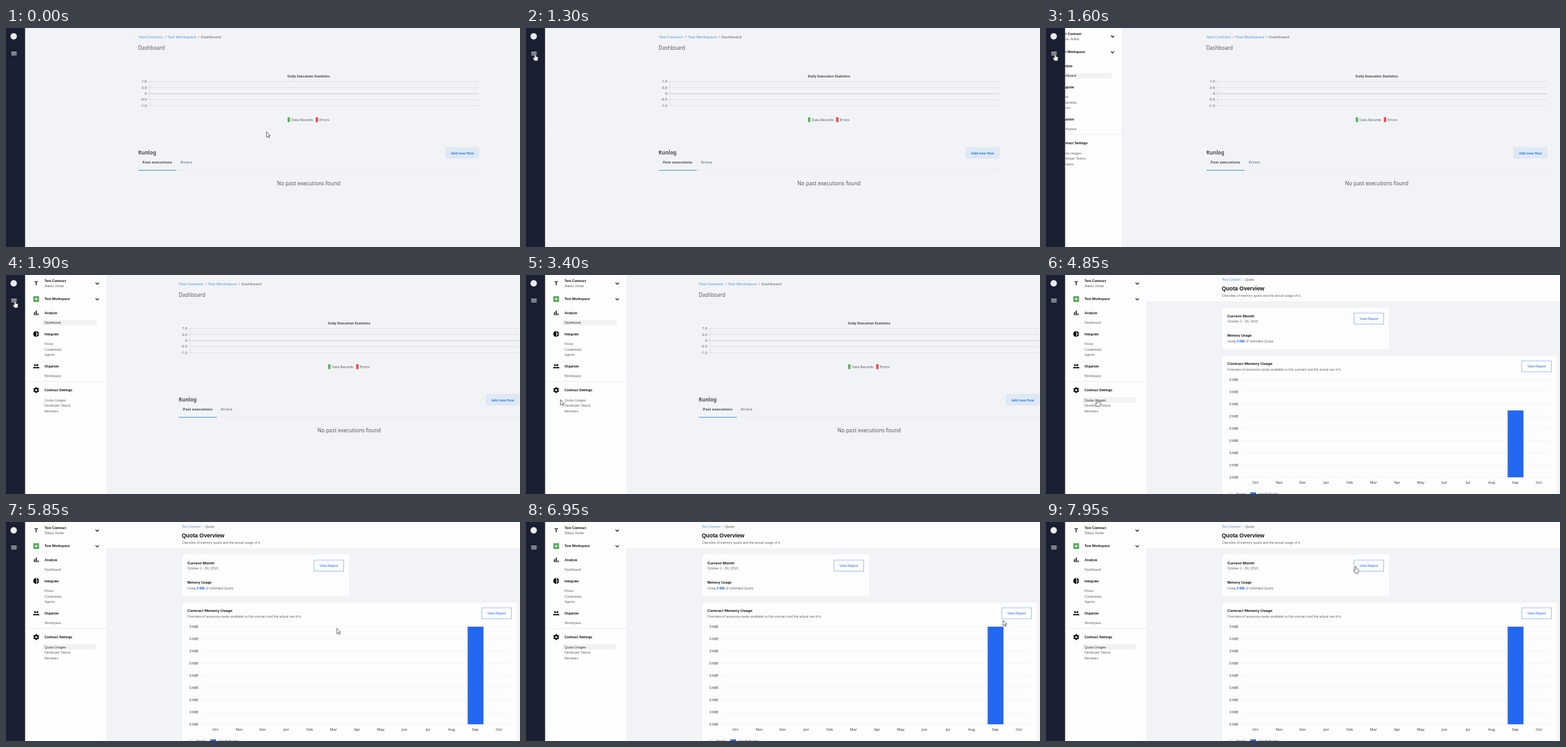
Animation, 800 px wide and 341 px high, one loop 8 s. Source, as an HTML page with a canvas:

```html
<!DOCTYPE html>
<html lang="en">
<head>
<meta charset="utf-8">
<title>Dashboard walkthrough</title>
<style>
html, body { margin: 0; width: 100%; height: 100%; overflow: hidden; background: #f2f3f7; }
canvas { display: block; width: 800px; height: 341px; }
</style>
</head>
<body>
<canvas id="stage"></canvas>
<script>
const LOOP = 8000, W = 800, H = 341;
const canvas = document.getElementById('stage');
const ctx = canvas.getContext('2d');
const ratio = window.devicePixelRatio || 1;
canvas.width = W * ratio;
canvas.height = H * ratio;

const HUMANIST = '"Noto Sans", sans-serif';
const GROTESK = '"Liberation Sans", sans-serif';
const BLUE = '#2468f2', LINK = '#4a8fe0', INK = '#111', GREY = '#666';

const clamp = v => Math.min(1, Math.max(0, v));
const linear = p => p;
const easeOut = p => 1 - (1 - p) ** 2;
const easeOutQuart = p => 1 - (1 - p) ** 4;
const smooth = p => p * p * (3 - 2 * p);

// Pointer stops: time, x, y, easing towards the stop
const STOPS = [
  [0, 405.5, 161.5, linear],
  [850, 15, 42, smooth],
  [950, 15, 42, linear],
  [1050, 14, 40.5, smooth],
  [2400, 14, 40.5, linear],
  [3250, 33, 194, smooth],
  [3850, 80, 194, easeOut],
  [4900, 80, 194, linear],
  [5500, 343, 187, linear],
  [5850, 514.5, 165.5, linear],
  [6300, 736, 153, linear],
  [7200, 744, 153, smooth],
  [7950, 482, 69, smooth],
  [8000, 482, 69, linear]
];

function pointerAt(t) {
  const i = Math.max(1, STOPS.findIndex(s => s[0] >= t));
  const [t0, x0, y0] = STOPS[i - 1], [t1, x1, y1, ease] = STOPS[i];
  const p = ease(clamp((t - t0) / (t1 - t0)));
  return { x: x0 + (x1 - x0) * p, y: y0 + (y1 - y0) * p };
}

const inside = (p, x, y, w, h) => p.x >= x && p.x <= x + w && p.y >= y && p.y <= y + h;

function rect(x, y, w, h, color) {
  ctx.fillStyle = color;
  ctx.fillRect(x, y, w, h);
}

function disc(x, y, r, color) {
  ctx.fillStyle = color;
  ctx.beginPath();
  ctx.arc(x, y, r, 0, Math.PI * 2);
  ctx.fill();
}

// Draws text and returns its right edge
function text(str, x, y, size, color, { font = GROTESK, bold = false, align = 'left' } = {}) {
  ctx.font = `${bold ? 'bold ' : ''}${size}px ${font}`;
  ctx.textAlign = align;
  ctx.fillStyle = color;
  ctx.fillText(str, x, y);
  return x + ctx.measureText(str).width;
}

const sans = (str, x, y, size, color, opt) => text(str, x, y, size, color, { font: HUMANIST, ...opt });
const strong = (str, x, y, size, color = INK) => text(str, x, y, size, color, { bold: true });

function drawDashboard(shift) {
  ctx.save();
  ctx.translate(shift, 0);
  sans('Test Contract', 206, 15.8, 6.15, LINK);
  sans('/', 247, 15.8, 6.15, '#777b85');
  sans('Test Workspace', 251.2, 15.8, 6.15, LINK);
  sans('/', 298.6, 15.8, 6.15, '#777b85');
  sans('Dashboard', 303.3, 15.8, 6.1, '#585c66');
  sans('Dashboard', 205.7, 34, 8, '#555963');
  rect(206, 44.5, 530, 0.5, '#e9ebef');

  sans('Daily Execution Statistics', 471, 77, 5.28, '#444', { bold: true, align: 'center' });
  ['1.0', '0.5', '0', '-0.5', '-1.0'].forEach((label, i) => {
    const y = 83 + i * 9.35;
    rect(219.5, y, 516, 0.9, i === 2 ? '#c3c5cb' : '#dddfe4');
    sans(label, 219, y + 2.3, 5.5, '#555', { align: 'right' });
  });
  rect(223, 83, 0.7, 37.5, '#d9dbe0');
  rect(438.3, 139, 3.7, 7.5, '#55b555');
  sans('Data Records', 444.2, 144.6, 5.42, '#555');
  rect(482, 139, 3.7, 7.5, '#e84a48');
  sans('Errors', 487.8, 144.6, 5.35, '#555');

  sans('Runlog', 205.7, 197, 7.95, '#4b4f59', { bold: true });
  rect(684, 185.3, 52.5, 18, '#dfe8f3');
  sans('Add new flow', 710.2, 196.6, 5.3, '#2f83e0', { bold: true, align: 'center' });
  sans('Past executions', 212.3, 211.4, 5.9, '#4b4f59', { bold: true });
  sans('Errors', 271.8, 211.4, 5.8, '#7d8798', { bold: true });
  rect(265, 221.4, 471, 0.6, '#e2e4e9');
  rect(206, 221, 59, 1.1, '#559be0');
  sans('No past executions found', 471, 245.2, 8.22, '#555963', { align: 'center' });
  ctx.restore();
}

function outlineButton(x, y, w, h, label) {
  ctx.strokeStyle = '#8db1f7';
  ctx.lineWidth = 0.8;
  ctx.strokeRect(x, y, w, h);
  text(label, x + w / 2, y + h / 2 + 1.9, 5.3, BLUE, { align: 'center' });
}

function card(x, y, w, h) {
  rect(x - 0.5, y - 0.3, w + 1, h + 1, '#ecedf1');
  rect(x, y, w, h, '#fdfdfe');
}

function drawQuota(t) {
  rect(156, 0, 644, 41.5, '#fdfdfe');
  rect(156, 41.5, 644, 0.6, '#ebecf0');
  text('Test Contract', 273.7, 9.4, 4.98, LINK);
  text('/', 306, 9.4, 4.98, '#888');
  text('Quota', 310, 9.4, 5.05, '#555');
  strong('Quota Overview', 273.5, 24.4, 8.73);
  text('Overview of memory quota and the actual usage of it.', 273.7, 34.3, 5.2, GREY);

  card(274, 50.5, 260, 65);
  strong('Current Month', 282.2, 65.8, 6.1);
  text('October 1 - 30, 2019', 282.2, 74, 5.2, GREY);
  strong('Memory Usage', 282.2, 95.8, 5.3);
  let x = text('Using ', 282.2, 104.6, 5.2, GREY);
  x = strong('0 MB', x, 104.6, 5.2, BLUE);
  text(' of Unlimited Quota', x, 104.6, 5.2, GREY);
  outlineButton(479.4, 59.2, 46.2, 17.4, 'View Report');

  card(274, 125.5, 521.5, 220);
  strong('Contract Memory Usage', 282.2, 140.2, 6.1);
  text('Overview of resources quota available to this contract and the actual use of it.',
    282.2, 148.6, 5.2, GREY);
  outlineButton(740.4, 133.8, 46.2, 17, 'View Report');

  for (let i = 0; i < 9; i++) {
    const y = 162.7 + i * 19;
    rect(303, y, 483, 0.6, '#ececf0');
    sans('0 MB', 298.8, y + 2.1, 5.6, '#333', { align: 'right' });
  }
  'Oct Nov Dec Jan Feb Mar Apr May Jun Jul Aug Sep Oct'.split(' ').forEach((month, i) =>
    sans(month, 326 + i * 36.75, 324.8, 5.8, '#333', { align: 'center' }));
  const height = 152 * easeOutQuart(clamp((t - 4600) / 1000));
  rect(718.5, 315 - height, 24.6, height, BLUE);

  rect(282.5, 338.5, 8.5, 4, '#ebebee');
  sans('Quota', 295.5, 343.2, 5.6, '#333');
  rect(318, 338.5, 9, 4, BLUE);
  sans('Used Quota', 331, 343.2, 5.6, '#333');
}

function chevron(x, y) {
  ctx.strokeStyle = INK;
  ctx.lineWidth = 1.2;
  ctx.beginPath();
  ctx.moveTo(x - 2.5, y - 1.2);
  ctx.lineTo(x, y + 1.3);
  ctx.lineTo(x + 2.5, y - 1.2);
  ctx.stroke();
}

function drawPie(x, y) {
  disc(x - 0.2, y, 4.6, INK);
  rect(x, y - 5, 0.9, 10, '#fff');
  rect(x, y - 0.4, 5, 0.9, '#fff');
}

function drawPeople(x, y) {
  for (const dx of [-1.8, 1.8]) {
    disc(x + dx, y - 1.7, 1.5, INK);
    ctx.beginPath();
    ctx.ellipse(x + dx * 1.3, y + 3.2, 2.7, 2.3, 0, Math.PI, 0);
    ctx.fill();
  }
}

function drawGear(x, y) {
  ctx.save();
  ctx.translate(x, y);
  for (let i = 0; i < 6; i++) {
    rect(-1.2, -4.6, 2.4, 3, INK);
    ctx.rotate(Math.PI / 3);
  }
  disc(0, 0, 3.5, INK);
  disc(0, 0, 1.5, '#fff');
  ctx.restore();
}

function drawDrawer(width, active, hover) {
  ctx.save();
  ctx.beginPath();
  ctx.rect(30, 0, width, H);
  ctx.clip();
  ctx.translate(width - 126, 0);
  rect(30, 0, 126, H, '#fefefe');

  text('T', 47, 16.3, 9, INK, { bold: true, align: 'center' });
  strong('Test Contract', 60, 10.8, 5.25);
  text('Status: Active', 60, 19.3, 4.9, '#555');
  chevron(142, 13.2);
  rect(42.5, 33, 9, 9, '#58ad5b');
  rect(45.5, 36, 3, 3, '#e4f3e4');
  strong('Test Workspace', 60, 39.3, 5.2);
  chevron(142, 37.5);

  rect(43.6, 58, 1.6, 4.6, INK);
  rect(46.3, 55.5, 1.6, 7.1, INK);
  rect(49, 60, 1.6, 2.6, INK);
  drawPie(47.2, 91.8);
  drawPeople(47, 142);
  rect(30, 165.5, 126, 0.7, '#e6e6e8');
  drawGear(47, 179.2);

  const heads = { Analyze: 61, Integrate: 93.8, Organize: 143.8, 'Contract Settings': 181 };
  for (const name in heads) strong(name, 60, heads[name], 5.2);

  const links = {
    Dashboard: 76.3, Flows: 109, Credentials: 117.6, Agents: 126.4, Workspace: 159,
    'Quota Usages': 196.5, 'Developer Teams': 205.1, Members: 213.6
  };
  for (const name in links) {
    const y = links[name];
    if (name === active) rect(57, y - 6.1, 84, 8.4, '#f2f2f3');
    text(name, 60, y, 5.2, name === active || name === hover ? '#333' : '#666');
  }
  ctx.restore();
}

function drawRail() {
  rect(0, 0, 29.7, H, '#1a2032');
  disc(12, 13, 5, '#e9ebef');
  for (const y of [37, 39.2, 41.4]) rect(8.2, y, 8.4, 1, '#f4f5f8');
}

const ARROW = new Path2D('M0 0V8.6L2 6.8L3.5 9.7L4.8 9.1L3.4 6.2H6Z');
const HAND = new Path2D('M-1 .7Q0-.6 1 .7V3.6L4 4.4Q5 4.8 4.8 6.2L4 10.6H-.8L-3.4 6.6Q-3 5.2-1 6.6Z');

function drawPointer(p, isHand) {
  const shape = isHand ? HAND : ARROW;
  ctx.save();
  ctx.translate(p.x, p.y);
  ctx.lineJoin = 'round';
  ctx.lineWidth = 0.8;
  ctx.fillStyle = '#fff';
  ctx.strokeStyle = '#4a4a50';
  ctx.fill(shape);
  ctx.stroke(shape);
  ctx.restore();
}

function draw(t) {
  ctx.setTransform(ratio, 0, 0, ratio, 0, 0);
  rect(0, 0, W, H, '#f2f3f7');

  const shift = t < 1250 ? 0 : 0.6 + 62.4 * smooth(clamp((t - 1380) / 350));
  const p = pointerAt(t);
  const overQuota = shift > 60 && inside(p, 60, 190, 81, 8);
  const overMenu = inside(p, 5, 33, 20, 15);
  const overReport = t >= 4650 && inside(p, 479, 59, 47, 18);

  if (t < 4400) drawDashboard(shift);
  else if (t >= 4650) drawQuota(t);
  drawDrawer(shift * 2, t < 4400 ? 'Dashboard' : 'Quota Usages', overQuota ? 'Quota Usages' : '');
  drawRail();
  drawPointer(p, overQuota || overMenu || overReport);
}

const start = performance.now();
function tick() {
  draw((performance.now() - start) % LOOP);
  requestAnimationFrame(tick);
}
tick();
</script>
</body>
</html>
```
